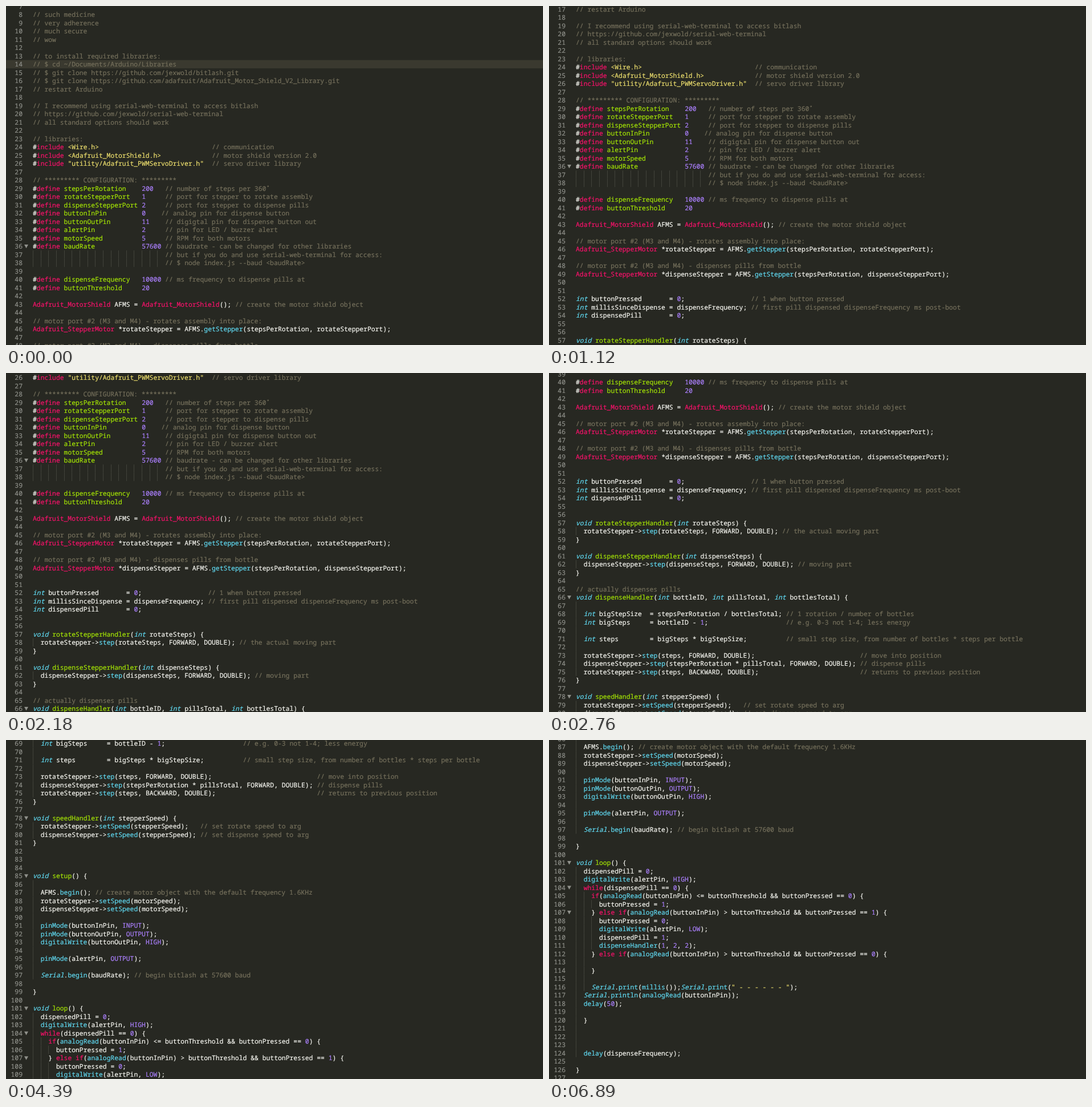
An HTML page with a canvas for the animation above (7.25 s loop, 942x594 px).

```html
<!DOCTYPE html>
<html lang="en">
<head>
<meta charset="utf-8">
<title>Scrolling code</title>
<style>
html, body { margin: 0; width: 100%; height: 100%; overflow: hidden; background: #272822; }
canvas { display: block; }
</style>
</head>
<body>
<canvas id="stage" width="942" height="594"></canvas>
<script>
const FIRST = 7;
const code = `
// such medicine
// very adherence
// much secure
// wow

// to install required libraries:
// $ cd ~/Documents/Arduino/Libraries
// $ git clone https://github.com/jexwold/bitlash.git
// $ git clone https://github.com/adafruit/Adafruit_Motor_Shield_V2_Library.git
// restart Arduino

// I recommend using serial-web-terminal to access bitlash
// https://github.com/jexwold/serial-web-terminal
// all standard options should work

// libraries:
#include <Wire.h>                             // communication
#include <Adafruit_MotorShield.h>             // motor shield version 2.0
#include "utility/Adafruit_PWMServoDriver.h"  // servo driver library

// ********* CONFIGURATION: *********
#define stepsPerRotation    200   // number of steps per 360˚
#define rotateStepperPort   1     // port for stepper to rotate assembly
#define dispenseStepperPort 2     // port for stepper to dispense pills
#define buttonInPin         0    // analog pin for dispense button
#define buttonOutPin        11    // digigtal pin for dispense button out
#define alertPin            2     // pin for LED / buzzer alert
#define motorSpeed          5     // RPM for both motors
#define baudRate            57600 // baudrate - can be changed for other libraries
                                  // but if you do and use serial-web-terminal for access:
                                  // $ node index.js --baud <baudRate>

#define dispenseFrequency   10000 // ms frequency to dispense pills at
#define buttonThreshold     20

Adafruit_MotorShield AFMS = Adafruit_MotorShield(); // create the motor shield object

// motor port #2 (M3 and M4) - rotates assembly into place:
Adafruit_StepperMotor *rotateStepper = AFMS.getStepper(stepsPerRotation, rotateStepperPort);

// motor port #2 (M3 and M4) - dispenses pills from bottle
Adafruit_StepperMotor *dispenseStepper = AFMS.getStepper(stepsPerRotation, dispenseStepperPort);


int buttonPressed       = 0;                 // 1 when button pressed
int millisSinceDispense = dispenseFrequency; // first pill dispensed dispenseFrequency ms post-boot
int dispensedPill       = 0;


void rotateStepperHandler(int rotateSteps) {
  rotateStepper->step(rotateSteps, FORWARD, DOUBLE); // the actual moving part
}

void dispenseStepperHandler(int dispenseSteps) {
  dispenseStepper->step(dispenseSteps, FORWARD, DOUBLE); // moving part
}

// actually dispenses pills
void dispenseHandler(int bottleID, int pillsTotal, int bottlesTotal) {

  int bigStepSize  = stepsPerRotation / bottlesTotal; // 1 rotation / number of bottles
  int bigSteps     = bottleID - 1;                    // e.g. 0-3 not 1-4; less energy

  int steps        = bigSteps * bigStepSize;          // small step size, from number of bottles * steps per bottle

  rotateStepper->step(steps, FORWARD, DOUBLE);                           // move into position
  dispenseStepper->step(stepsPerRotation * pillsTotal, FORWARD, DOUBLE); // dispense pills
  rotateStepper->step(steps, BACKWARD, DOUBLE);                          // returns to previous position
}

void speedHandler(int stepperSpeed) {
  rotateStepper->setSpeed(stepperSpeed);   // set rotate speed to arg
  dispenseStepper->setSpeed(stepperSpeed); // set dispense speed to arg
}



void setup() {

  AFMS.begin(); // create motor object with the default frequency 1.6KHz
  rotateStepper->setSpeed(motorSpeed);
  dispenseStepper->setSpeed(motorSpeed);

  pinMode(buttonInPin, INPUT);
  pinMode(buttonOutPin, OUTPUT);
  digitalWrite(buttonOutPin, HIGH);

  pinMode(alertPin, OUTPUT);

  Serial.begin(baudRate); // begin bitlash at 57600 baud

}

void loop() {
  dispensedPill = 0;
  digitalWrite(alertPin, HIGH);
  while(dispensedPill == 0) {
    if(analogRead(buttonInPin) <= buttonThreshold && buttonPressed == 0) {
      buttonPressed = 1;
    } else if(analogRead(buttonInPin) > buttonThreshold && buttonPressed == 1) {
      buttonPressed = 0;
      digitalWrite(alertPin, LOW);
      dispensedPill = 1;
      dispenseHandler(1, 2, 2);
    } else if(analogRead(buttonInPin) > buttonThreshold && buttonPressed == 0) {

    }

    Serial.print(millis());Serial.print(" - - - - - - ");
  Serial.println(analogRead(buttonInPin));
  delay(50);

  }



  delay(dispenseFrequency);

}
`;

const W = 942, H = 594, LOOP = 7250;
const CHAR = 6.826, ROW = 14.5, LEFT = 47, GUTTER = 29;
const CURRENT = 14, FOLDS = [36, 66, 78, 85, 101, 104, 107];
const color = {
  back: '#272822', row: '#3a392f', guide: '#42433b', gutter: '#8f908a',
  text: '#f8f8f2', comment: '#75705c', key: '#f9126b', name: '#a4e405',
  type: '#60d9f1', number: '#ac80ff', string: '#eee06e'
};

const ctx = document.getElementById('stage').getContext('2d');
const family = '"Noto Sans Mono", "DejaVu Sans Mono", monospace';
ctx.font = '100px ' + family;
const size = 100 * CHAR / ctx.measureText('0').width;
const plain = `${size}px ${family}`, italic = 'italic ' + plain;

const TOKEN = /\/\/.*|"[^"]*"|<[\w.]+>|\w+|[^\w\s]+?/g;

function kind(word, before, after) {
  if (word.startsWith('//')) return 'comment';
  if (/^("|<\w)/.test(word)) return 'string';
  if (/^(\d+|INPUT|OUTPUT|HIGH|LOW)$/.test(word)) return 'number';
  if (/^(include|define|while|if|else|Adafruit_\w+)$/.test(word)) return 'key';
  if (/^(int|void|Serial)$/.test(word)) return 'type';
  if (/^\w/.test(word)) {
    if (/(void|define) $/.test(before)) return 'name';
    if (after[0] === '(') return 'type';
  }
  return 'text';
}

function tokenize(line) {
  return [...line.matchAll(TOKEN)].map(m => {
    const word = m[0], end = m.index + word.length;
    return {
      word,
      x: LEFT + m.index * CHAR,
      fill: color[kind(word, line.slice(0, m.index), line.slice(end))],
      font: /^(int|void|Serial)$/.test(word) ? italic : plain
    };
  });
}

const lines = code.split('\n');
const rows = lines.map((line, i) => {
  // blank lines take the indent of the next filled line
  const filled = lines.slice(i).find(s => s.trim()) || '';
  return { tokens: tokenize(line), indent: filled.search(/\S|$/) };
});

// [time, step] and [step, scroll distance]
const clock = [[0, 0], [90, 1], [1120, 7], [1300, 8], [2180, 14], [2320, 15], [2470, 16],
  [2760, 18], [3500, 23], [3640, 24], [3790, 25], [4680, 31], [4830, 32], [5130, 34]];
const path = [[0, 0], [7, 140], [14, 268], [18, 463], [25, 689], [34, 1148.5]];

function along(points, x) {
  const i = points.findIndex(p => p[0] > x);
  if (i < 0) return points[points.length - 1][1];
  const [x0, y0] = points[i - 1], [x1, y1] = points[i];
  return y0 + (y1 - y0) * (x - x0) / (x1 - x0);
}

const scrollAt = t => along(path, Math.floor(along(clock, t) + 1e-6));

function put(text, x, y) {
  ctx.fillText(text, x, y);
  ctx.strokeText(text, x, y);
}

function drawFold(y) {
  ctx.beginPath();
  ctx.moveTo(32, y - 3);
  ctx.lineTo(39, y - 3);
  ctx.lineTo(35.5, y + 3.5);
  ctx.fill();
}

function drawRow(row, n, y) {
  const top = y - ROW / 2, base = y + 4;
  if (n === CURRENT) {
    ctx.fillStyle = color.row;
    ctx.fillRect(0, top, W, ROW);
  }
  ctx.fillStyle = color.guide;
  for (let c = 0; c < row.indent; c += 2) {
    ctx.fillRect(Math.round(LEFT + c * CHAR), top, 1, ROW);
  }
  ctx.fillStyle = ctx.strokeStyle = color.gutter;
  ctx.font = plain;
  ctx.textAlign = 'right';
  put(n, GUTTER, base);
  if (FOLDS.includes(n)) drawFold(y);
  ctx.textAlign = 'left';
  for (const t of row.tokens) {
    ctx.font = t.font;
    ctx.fillStyle = ctx.strokeStyle = t.fill;
    put(t.word, t.x, base);
  }
}

function draw(t) {
  const scroll = scrollAt(t);
  ctx.fillStyle = color.back;
  ctx.fillRect(0, 0, W, H);
  rows.forEach((row, i) => {
    const y = 0.5 + i * ROW - scroll;
    if (y > -ROW && y < H + ROW) drawRow(row, FIRST + i, y);
  });
}

ctx.textRendering = 'geometricPrecision';
ctx.lineWidth = 0.2;
ctx.lineJoin = 'round';

const start = performance.now();
function tick() {
  draw((performance.now() - start) % LOOP);
  requestAnimationFrame(tick);
}
tick();
</script>
</body>
</html>
```
